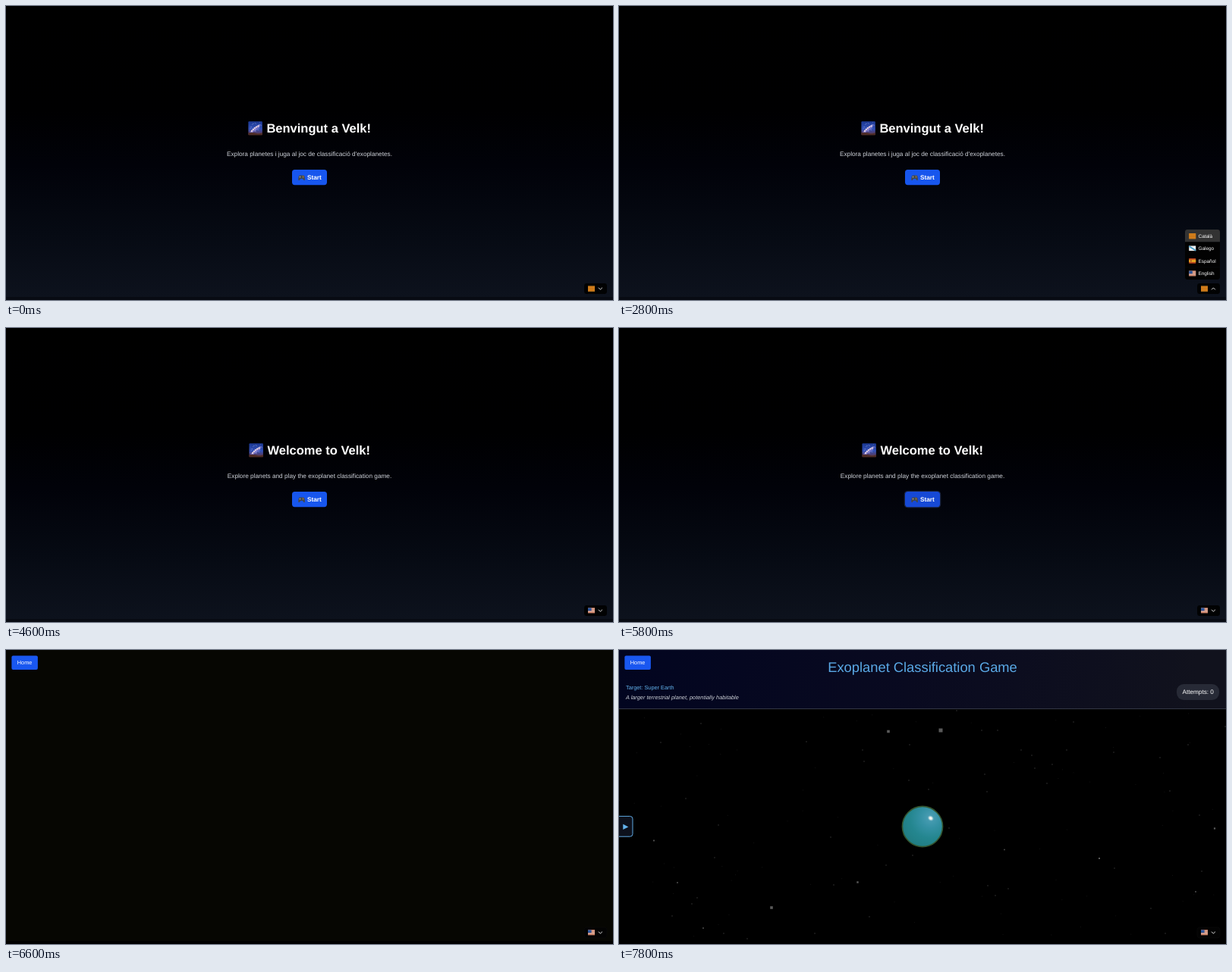
Write an HTML page that moves like this. It is 800x388 px and loops after 8000 ms.

```html
<!DOCTYPE html>
<html lang="en">
<head>
<meta charset="utf-8">
<title>Exoplanet game</title>
<style>
  html, body { margin: 0; width: 100%; height: 100%; overflow: hidden; background: #000; }
  svg { display: block; width: 100vw; height: 100vh; }
  text { font-family: "Liberation Sans", Arial, sans-serif; text-rendering: geometricPrecision; fill: #fff; }
  .mid { text-anchor: middle; }
  .bold { font-weight: bold; }
</style>
</head>
<body>
<svg viewBox="0 0 800 388" preserveAspectRatio="none">
  <defs>
    <linearGradient id="sky" x1="0" y1="0" x2="0" y2="1">
      <stop offset="0" stop-color="#000"/>
      <stop offset=".36" stop-color="#000001"/>
      <stop offset=".55" stop-color="#010209"/>
      <stop offset=".78" stop-color="#060a13"/>
      <stop offset="1" stop-color="#0d121d"/>
    </linearGradient>
    <linearGradient id="bar" gradientUnits="userSpaceOnUse" x1="0" y1="0" x2="760" y2="78">
      <stop offset="0" stop-color="#020520"/>
      <stop offset=".5" stop-color="#090a20"/>
      <stop offset="1" stop-color="#11121d"/>
    </linearGradient>
    <radialGradient id="ball" cx=".7" cy=".28" r=".85">
      <stop offset="0" stop-color="#4d9fb6"/>
      <stop offset=".3" stop-color="#3491a4"/>
      <stop offset=".6" stop-color="#24868f"/>
      <stop offset="1" stop-color="#207b80"/>
    </radialGradient>
    <radialGradient id="shine">
      <stop offset="0" stop-color="#fff"/>
      <stop offset=".4" stop-color="#f1f6ee" stop-opacity=".9"/>
      <stop offset="1" stop-color="#8cc0cc" stop-opacity="0"/>
    </radialGradient>
    <linearGradient id="night" x1="0" y1="0" x2="0" y2="1">
      <stop offset="0" stop-color="#1a3791"/>
      <stop offset=".55" stop-color="#3452b8"/>
      <stop offset=".8" stop-color="#4c3f78"/>
      <stop offset="1" stop-color="#6b3a2c"/>
    </linearGradient>

    <g id="ca">
      <rect width="9" height="7.4" fill="#d98a1c"/>
      <path d="M0 1.2H9M0 2.9H9M0 4.6H9M0 6.3H9" stroke="#c26a1a" stroke-width=".8"/>
    </g>
    <g id="gl">
      <rect width="9" height="6.6" fill="#eef1f2"/>
      <path d="M0 .4L9 6.2" stroke="#4a9fc9" stroke-width="1.8"/>
    </g>
    <g id="es">
      <rect width="9" height="6.8" fill="#b8401f"/>
      <rect y="1.7" width="9" height="3.4" fill="#e6a421"/>
      <rect x="1.8" y="2.3" width="1.7" height="2.2" fill="#a8552a"/>
    </g>
    <g id="en">
      <rect width="9" height="6.8" fill="#e4ddda"/>
      <path d="M0 .5H9M0 2.4H9M0 4.4H9M0 6.3H9" stroke="#c4552f" stroke-width=".95"/>
      <rect width="4.6" height="3.8" fill="#2c559a"/>
    </g>
  </defs>

  <rect width="800" height="388"/>

  <g id="home">
    <rect width="800" height="384" fill="url(#sky)"/>
    <rect y="384" width="800" height="4" fill="#080b13"/>
    <g id="galaxy">
      <rect width="18.4" height="18" rx="1" fill="url(#night)"/>
      <path d="M1.5 15Q7 7 17 3.5Q14 11 4 15.5Z" fill="#8a7fd0" opacity=".75"/>
      <path d="M4 13.5Q8 8 14.5 5.5" fill="none" stroke="#f0dbe6" stroke-width="2" stroke-dasharray="2 .7"/>
      <g id="sparks" fill="#d5dcff"></g>
      <path d="M0 15Q6 14 10 15.6T18.4 15V18H0Z" fill="#4e2c26"/>
    </g>
    <text id="title" class="bold" y="167" font-size="16.5"></text>
    <text id="intro" class="mid" x="400" y="197.9" font-size="8.25" style="fill:#d0d4da"></text>
    <rect id="ring" x="376.3" y="215.4" width="47.4" height="21.4" rx="4" fill="none" stroke="#27375f" stroke-width=".8"/>
    <rect id="start" x="377" y="216" width="46" height="20.2" rx="3.6"/>
    <g transform="translate(385 222.2)">
      <path d="M2 1.2H7.2Q8.4 1.2 8.8 4.5T8.2 8Q7.4 8 6 5.8H3.2Q1.8 8 1 8Q0 7.8 .4 4.5T2 1.2Z" fill="#44474b"/>
      <path d="M1.4 3.4H3.6M2.5 2.3V4.5" stroke="#9aa0a5" stroke-width=".7"/>
      <circle cx="6.3" cy="2.7" r=".55" fill="#d5b23a"/>
      <circle cx="7.3" cy="3.5" r=".55" fill="#cf4b3c"/>
      <circle cx="6.2" cy="4.3" r=".55" fill="#55a866"/>
    </g>
    <text class="bold" x="396.9" y="229.2" font-size="8.25">Start</text>
  </g>

  <g id="game">
    <rect id="blank" width="800" height="384" fill="#060602"/>
    <g id="scene">
      <rect width="800" height="388"/>
      <g id="stars"></g>
      <circle cx="400" cy="233" r="26.6" fill="url(#ball)" stroke="#34552f" stroke-width="1.6"/>
      <ellipse cx="410.8" cy="222" rx="4.6" ry="3.8" fill="url(#shine)" transform="rotate(35 410.8 222)"/>
      <rect width="800" height="78" fill="url(#bar)"/>
      <rect y="77.2" width="800" height=".9" fill="#3a3f4d"/>
      <text class="mid" x="400" y="29.2" font-size="18.33" style="fill:#5aa9e6">Exoplanet Classification Game</text>
      <text x="9" y="51.7" font-size="7.33" style="fill:#63b3ed">Target: Super Earth</text>
      <text x="9" y="64.6" font-size="7.33" font-style="italic" style="fill:#cdd1d8">A larger terrestrial planet, potentially habitable</text>
      <rect x="735" y="45" width="56" height="21" rx="9.2" fill="#272a36"/>
      <text class="mid" x="763.2" y="58.4" font-size="8.2">Attempts: 0</text>
      <path d="M-1 219.4H14.5Q18 219.4 18 222.9V242.7Q18 246.2 14.5 246.2H-1" fill="#0d111c" stroke="#5fa9e2"/>
      <path d="M5.3 229.8L12.4 233.4L5.3 237Z" fill="#63b3ed"/>
    </g>
    <rect x="7.4" y="7.6" width="34.5" height="18.3" rx="2" fill="#1957f0"/>
    <text class="mid" x="24.6" y="18.8" font-size="7.33">Home</text>
  </g>

  <g id="menu"></g>
  <rect id="pick" x="762" y="366" width="30" height="14" rx="3.4"/>
  <use id="flag" x="767" y="369.4"/>
  <path id="arrow" fill="none" stroke="#e8e8e8" stroke-width=".95" stroke-linecap="round" stroke-linejoin="round"/>
</svg>

<script>
const LOOP = 8000;
const $ = id => document.getElementById(id);
const show = (id, on) => $(id).setAttribute('display', on ? 'inline' : 'none');

function add(parent, tag, attrs, text) {
  const el = document.createElementNS('http://www.w3.org/2000/svg', tag);
  for (const k in attrs) el.setAttribute(k, attrs[k]);
  if (text) el.textContent = text;
  parent.appendChild(el);
  return el;
}

function random(seed) {
  return () => (seed = seed * 16807 % 2147483647) / 2147483647;
}

const words = {
  ca: { title: 'Benvingut a Velk!', x: 343.4, intro: "Explora planetes i juga al joc de classificació d'exoplanetes." },
  en: { title: 'Welcome to Velk!', x: 344.5, intro: 'Explore planets and play the exoplanet classification game.' }
};

// Language menu
const langs = [['ca', 'Català'], ['gl', 'Galego'], ['es', 'Español'], ['en', 'English']];
const menu = $('menu');
const clip = add(menu, 'clipPath', { id: 'round' });
add(clip, 'rect', { x: 746, y: 295, width: 46, height: 66, rx: 3.4 });
const list = add(menu, 'g', { 'clip-path': 'url(#round)' });
const rows = langs.map(([code, name], i) => {
  const y = 295 + i * 16.5;
  const row = add(list, 'rect', { x: 746, y, width: 46, height: 16.5 });
  add(list, 'use', { href: '#' + code, x: 751.2, y: y + 5 });
  add(list, 'text', { x: 763.5, y: y + 10.6, 'font-size': 6.42 }, name);
  return row;
});

// Sky behind the planet: large squares (x, y, size), then small ones (x, y)
const large = [
  355,107.5,3.6, 424,106,5, 201,340,3.6, 314.5,306.5,2.4, 785,235.5,2.2, 633,275,2,
  46,251.5,1.8, 77,307,1.6, 760,319,1.6, 111,367,1.6, 508,263.5,1.5
];
const small = [
  323,147, 571,151, 548,156, 544,139, 564,176, 247,121, 108,97, 55,122, 599,95, 590,132,
  652,135, 713,142, 750,125, 485,187, 383,125, 321,132, 88,196, 131,231, 126,274, 103,327,
  96,335, 70,351, 138,374, 169,381, 283,310, 330,352, 486,311, 496,324, 513,315, 653,288,
  726,186, 765,218, 720,374, 701,341, 258,374, 352,284, 387,271, 408,184, 382,172, 279,247,
  435,235, 482,164, 478,106, 499,106, 530,132, 445,80, 799,101, 768,292
];
function star(x, y, size, fill) {
  add($('stars'), 'rect', { x: x - size / 2, y: y - size / 2, width: size, height: size, fill });
}
for (let i = 0; i < large.length; i += 3) star(large[i], large[i + 1], large[i + 2], '#5a5a5a');
for (let i = 0; i < small.length; i += 2) star(small[i], small[i + 1], 1.1, '#4a4a4a');
const rnd = random(41);
for (let i = 0; i < 80; i++) star(rnd() * 800, 80 + rnd() * 302, .8, '#1c1c1c');
for (let i = 0; i < 16; i++) {
  add($('sparks'), 'circle', { cx: 1 + rnd() * 16.4, cy: 1 + rnd() * 12, r: .25 + rnd() * .25 });
}

function hoveredRow(t) {
  if (t < 3000) return -1;
  return t >= 3200 && t < 3600 ? 2 : 3;
}

function render(t) {
  const lang = t < 4400 ? 'ca' : 'en';
  const open = t >= 2800 && t < 4400;
  const playing = t >= 6400;

  show('home', !playing);
  show('game', playing);
  show('scene', t >= 7000);
  show('menu', open);
  show('ring', t >= 5800);

  const w = words[lang];
  $('title').textContent = w.title;
  $('title').setAttribute('x', w.x);
  $('intro').textContent = w.intro;
  $('galaxy').setAttribute('transform', `translate(${w.x - 24} 152.3)`);
  $('start').setAttribute('fill', t >= 5400 ? '#1649d6' : '#1756ee');

  const hover = hoveredRow(t);
  rows.forEach((row, i) => row.setAttribute('fill', i === 0 ? '#333' : i === hover ? '#1a1a1a' : '#020202'));

  $('flag').setAttribute('href', '#' + lang);
  $('pick').setAttribute('fill', playing ? '#030303' : '#010203');
  $('pick').setAttribute('stroke', playing ? '#0d0d0d' : 'none');
  $('pick').setAttribute('stroke-width', .6);
  $('arrow').setAttribute('d', open ? 'M781.2 374.1L783.4 371.9L785.6 374.1' : 'M781.2 372L783.4 374.2L785.6 372');
}

const begin = performance.now();
function tick() {
  render((performance.now() - begin) % LOOP);
  requestAnimationFrame(tick);
}
render(0);
requestAnimationFrame(tick);
</script>
</body>
</html>
```
